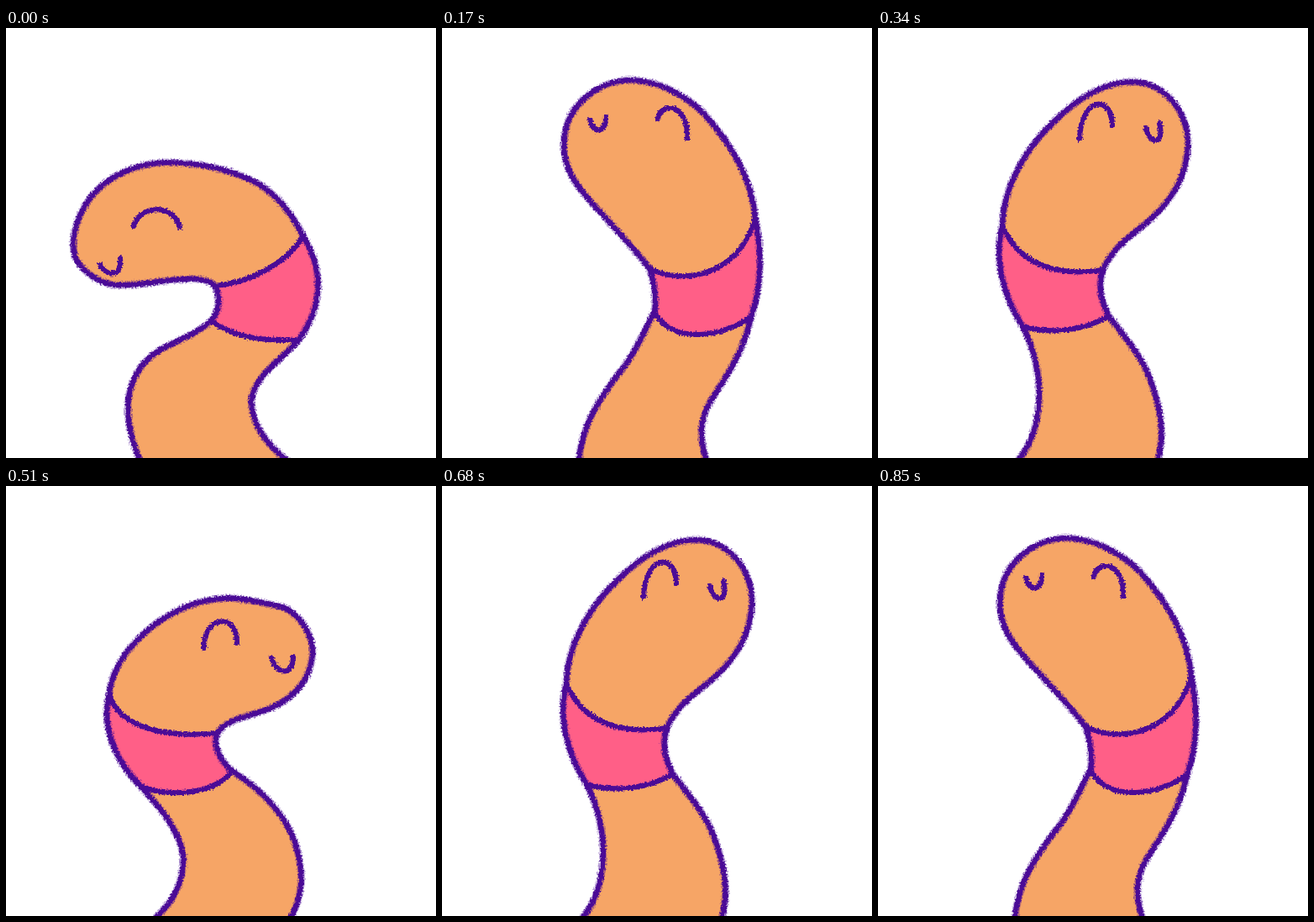
Write an HTML page that moves like this. It is 512 px wide and 512 px high and loops after 1020 ms.

```html
<!DOCTYPE html>
<html lang="en">
<head>
<meta charset="utf-8">
<title>Wiggling worm</title>
<style>
  html, body { margin: 0; width: 100%; height: 100%; overflow: hidden; background: #fff; }
  svg { display: block; width: 100vw; height: 100vh; }
  .body { fill: #f6a566; }
  .scarf { fill: #ff5f87; }
  .ink path { fill: none; stroke: #4b0b96; stroke-width: 6.2; stroke-linecap: round; stroke-linejoin: round; }
  .ink .fuzz { stroke-width: 9; stroke-opacity: .38; }

  .pose { opacity: 0; animation: 1020ms step-end infinite; }
  #low-left { animation-name: low-left; }
  #high-left { animation-name: high-left; }
  #high-right { animation-name: high-right; }
  #low-right { animation-name: low-right; }
  @keyframes low-left { 0% { opacity: 1 } 16.666%, 100% { opacity: 0 } }
  @keyframes high-left { 0%, 33.333% { opacity: 0 } 16.666%, 83.333%, 100% { opacity: 1 } }
  @keyframes high-right { 0%, 50%, 83.333%, 100% { opacity: 0 } 33.333%, 66.666% { opacity: 1 } }
  @keyframes low-right { 0%, 66.666%, 100% { opacity: 0 } 50% { opacity: 1 } }
</style>
</head>
<body>
<svg id="stage" viewBox="0 0 512 512">
  <filter id="crayon" filterUnits="userSpaceOnUse" x="0" y="0" width="512" height="512" color-interpolation-filters="sRGB">
    <feTurbulence type="fractalNoise" baseFrequency=".5" numOctaves="2" seed="4"/>
    <feDisplacementMap in="SourceGraphic" scale="6" xChannelSelector="R" yChannelSelector="G"/>
  </filter>
</svg>
<script>
  // Outline runs from the left foot over the head to the right foot.
  // left / right: the outline beside the scarf; top / bottom: the scarf seams.
  const poses = {
    'low-left': {
      foot: 'M160 516C148 488 143 464 146 440C150 415 162 396 184 383C205 371 226 365',
      a: '244 349', left: 'C255 336 255 320', b: '249 307',
      head: 'C238 296 215 298 190 301C165 304 150 307 130 306C106 303 88 286 82 272C76 250 85 222 102 200C124 174 158 161 190 160C225 160 262 166 298 184C322 198 341 222',
      c: '354 248', right: 'C378 288 378 330', d: '349 371',
      tail: 'C330 394 296 412 292 444C293 472 310 496 336 516',
      top: 'C290 303 332 282', bottom: 'C315 374 274 370',
      face: 'M152 236C158 212 198 207 207 237M112 282C118 295 138 299 136 274'
    },
    'high-left': {
      foot: 'M163 516C166 474 186 444 210 412C230 388 240 362',
      a: '253 338', left: 'C256 320 252 302', b: '247 286',
      head: 'C228 262 204 236 180 210C158 186 145 166 145 138C146 92 186 62 226 62C256 63 288 78 312 102C344 138 369 178',
      c: '373 226', right: 'C382 268 380 310', d: '368 344',
      tail: 'C358 390 336 418 320 444C305 470 307 488 315 516',
      top: 'C278 304 352 302', bottom: 'C334 368 274 378',
      face: 'M257 108C261 87 294 90 292 132M176 109C179 126 196 127 195 105'
    },
    'high-right': {
      foot: 'M166 516C186 492 192 464 192 434C191 402 183 376',
      a: '172 355', left: 'C148 316 138 276', b: '148 235',
      head: 'C149 192 173 147 206 115C238 82 272 64 304 64C344 66 370 102 369 140C367 186 340 218 306 243C290 256 275 270',
      c: '268 288', right: 'C261 306 266 326', d: '275 343',
      tail: 'C297 373 317 392 328 430C339 464 340 488 333 516',
      top: 'C167 281 212 297', bottom: 'C244 361 206 365',
      face: 'M240 132C242 82 278 78 279 116M319 119C322 137 342 142 335 113'
    },
    'low-right': {
      foot: 'M176 516C202 494 212 466 211 440C206 408 182 382',
      a: '161 358', left: 'C130 328 113 286', b: '123 247',
      head: 'C128 204 168 164 212 145C256 126 286 134 332 145C352 156 366 178 365 200C362 236 336 258 308 267C284 276 262 278',
      c: '252 294', right: 'C245 308 256 328', d: '269 339',
      tail: 'C303 361 331 388 344 424C356 462 353 490 338 516',
      top: 'C134 291 198 300', bottom: 'C250 367 196 371',
      face: 'M236 193C234 155 276 149 275 187M316 205C323 226 342 226 342 203'
    }
  };

  const path = (cls, d) => `<path class="${cls}" d="${d}"/>`;

  function draw([id, p]) {
    const outline = [p.foot, p.a, p.left, p.b, p.head, p.c, p.right, p.d, p.tail].join(' ');
    const scarf = ['M', p.a, p.left, p.b, p.top, p.c, p.right, p.d, p.bottom, p.a, 'Z'].join(' ');
    const seams = ['M', p.b, p.top, p.c, 'M', p.d, p.bottom, p.a].join(' ');
    return `<g id="${id}" class="pose">` +
      path('body', outline) + path('scarf', scarf) +
      '<g class="ink" filter="url(#crayon)">' +
      path('fuzz', outline) + path('line', outline) + path('line', seams) + path('face', p.face) +
      '</g></g>';
  }

  document.getElementById('stage').insertAdjacentHTML('beforeend', Object.entries(poses).map(draw).join(''));
</script>
</body>
</html>
```
